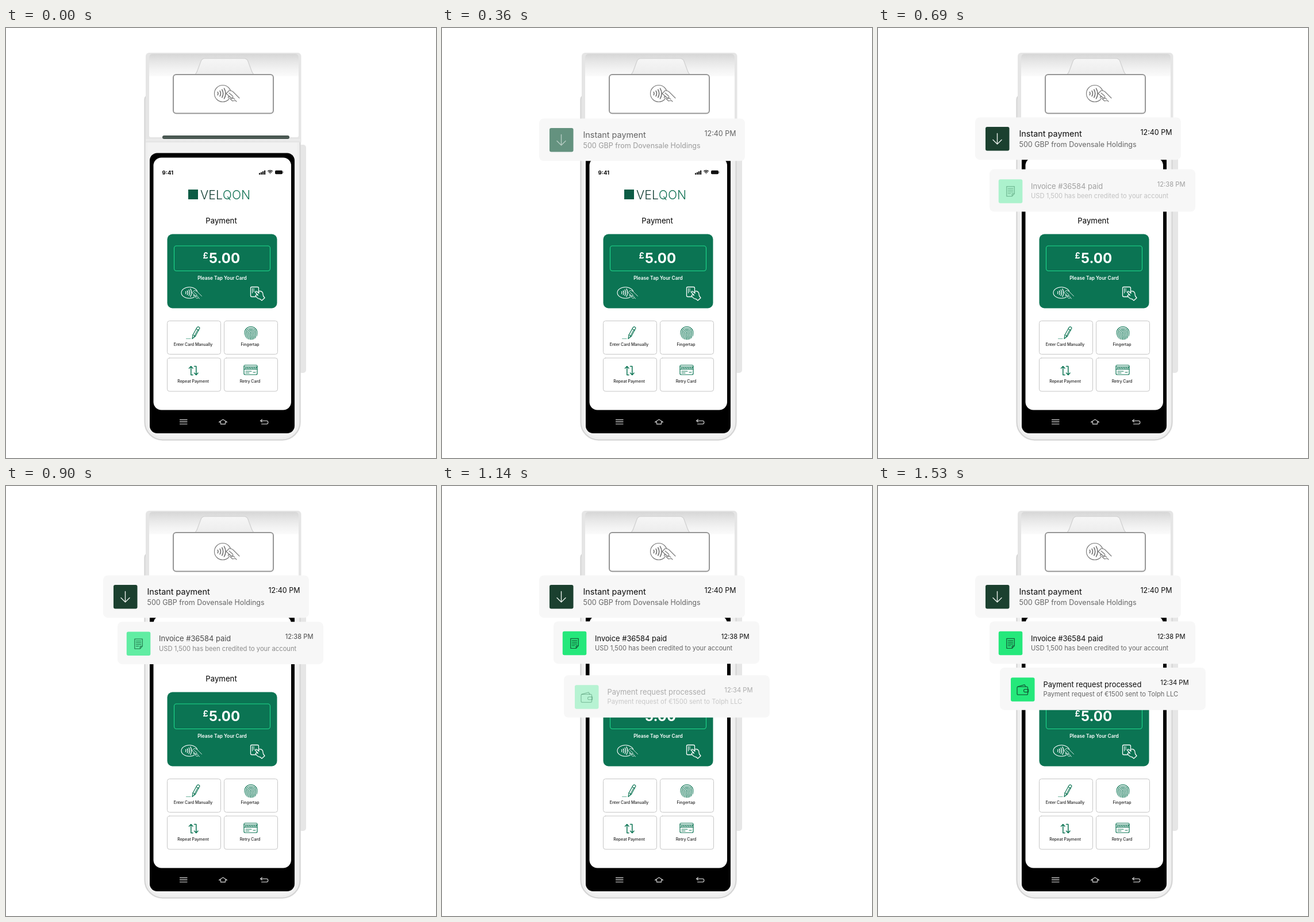
An HTML page with a canvas that plays this animation: 748 by 748 pixels, repeating every 4770 ms.

```html
<!DOCTYPE html>
<html lang="en">
<head>
<meta charset="utf-8">
<title>Payment notifications</title>
<style>
  html, body { margin: 0; width: 100%; height: 100%; overflow: hidden; background: #fff; }
  canvas { display: block; width: 748px; height: 748px; }
</style>
</head>
<body>
<canvas id="stage" width="748" height="748"></canvas>
<script>
const ctx = document.getElementById('stage').getContext('2d');
const LOOP = 4770, TICK = 30, STAGGER = 480, DURATION = 570, RISE = 41;
const FONT = 'Inter, "Open Sans", sans-serif';
const GREEN = '#0b7453';
const start = performance.now();

function box(x, y, w, h, r, fill, stroke, line = 1) {
  ctx.beginPath();
  ctx.roundRect(x, y, w, h, r);
  if (fill) { ctx.fillStyle = fill; ctx.fill(); }
  if (stroke) { ctx.strokeStyle = stroke; ctx.lineWidth = line; ctx.stroke(); }
}

function text(str, x, y, size, weight, color, align = 'left') {
  ctx.font = `${weight} ${size}px ${FONT}`;
  ctx.textAlign = align;
  ctx.fillStyle = color;
  ctx.fillText(str, x, y);
}

function path(d, stroke, line = 1, fill) {
  const p = new Path2D(d);
  if (fill) { ctx.fillStyle = fill; ctx.fill(p); }
  if (stroke) {
    ctx.strokeStyle = stroke;
    ctx.lineWidth = line;
    ctx.lineCap = ctx.lineJoin = 'round';
    ctx.stroke(p);
  }
}

function shade(y0, y1, ...stops) {
  const g = ctx.createLinearGradient(0, y0, 0, y1);
  stops.forEach((c, i) => g.addColorStop(i / (stops.length - 1), c));
  return g;
}

function at(x, y, draw) {
  ctx.save();
  ctx.translate(x, y);
  draw();
  ctx.restore();
}

// Contactless waves with a hand holding a card
function tapIcon(x, y, rx, ry, scale, color, back) {
  at(x, y, () => {
    ctx.beginPath();
    ctx.ellipse(0, 0, rx, ry, 0, 0, 7);
    ctx.strokeStyle = color;
    ctx.lineWidth = 1.1;
    ctx.stroke();
    ctx.scale(scale, scale);
    ctx.lineWidth = 1.7;
    ctx.lineCap = 'round';
    for (let i = 0; i < 4; i++) {
      ctx.beginPath();
      ctx.arc(-13, 0, 5 + i * 4.3, -0.52, 0.52);
      ctx.stroke();
    }
    path('M6 1L11 -5L17 -4L23 2L29 8L23 14L18 10L14 12L9 8Z', null, 0, back);
    path('M6 0L11 -5Q14 -6 18 -3L24 3L29 8M6 0L14 7M11 -1L17 4Q19 7 16 8L10 5Q8 8 13 9L17 13L22 12L24 14M14 9L18 8L21 10', color, 1.1);
  });
}

function cardHandIcon() {
  at(425, 450, () => {
    box(0.5, 0.5, 14, 17, 2, null, '#fff', 1.3);
    path('M3.5 3V11M6 3V9', '#fff', 1);
    path('M8.5 9.5Q9 7 11.5 8.5L15 11.5L14.5 8Q19 6.5 21.5 10.5L22.5 16L25 19.5L20 24L17 21.5Q12 21 9 15.5Q10.5 13 13.5 15Z', '#fff', 1.3, GREEN);
  });
}

function pencilIcon() {
  path('M313.5 540.5H321', '#6fb49d', 1);
  path('M324 540.5L325 534L332.5 520.5Q335 518.5 337 522L329.5 536Z', GREEN, 1.2);
  path('M331 523.5L335.5 526M325 534L329.5 536M334 524L327 537', GREEN, 1);
}

function fingerIcon() {
  at(426, 530.5, () => {
    ctx.beginPath();
    ctx.ellipse(0, 0, 11.8, 12, 0, 0, 7);
    ctx.clip();
    for (let r = 1.2; r < 12; r += 2.45) {
      path(`M${-r - 1} 11Q${-r} 6 ${-r} 0A${r} ${r} 0 0 1 ${r} 0Q${r} 6 ${r - 1.5} 12`, GREEN, 1.15);
    }
  });
}

function repeatIcon() {
  path('M325 603.5H321.8V589M318.5 592L321.8 588.5L325 592', GREEN, 1.5);
  path('M327.5 588.5H330.8V603M327.5 600L330.8 603.5L334 600', GREEN, 1.5);
}

function retryIcon() {
  box(414, 586.5, 23, 16.5, 2, null, GREEN, 1.2);
  path('M414 589.5H437M414 593.5H437', GREEN, 1);
  for (let x = 416; x < 436; x += 3) path(`M${x} 593L${x + 2} 590`, GREEN, 1.2);
  path('M417 597H427M417 600H423M430 599H434', GREEN, 1);
}

function printer() {
  box(243, 43, 270.5, 156, [6, 6, 0, 0], '#e5e5e5');
  box(249, 45, 260, 145, [5, 5, 3, 3], '#fff');
  box(249, 45, 260, 39, [5, 5, 0, 0], shade(45, 84, '#d6d6d6', '#e6e6e6', '#f2f2f2', '#fbfbfb'));
  path('M327 82Q331 80 333 74L339 58Q341 53 346 53H414Q419 53 421 58L427 74Q429 80 433 82Z', '#d0d0d0', 1.2,
    shade(53, 82, '#f6f6f6', '#ececec'));
  box(291, 81, 174, 67.5, 5, '#fff', '#969696', 2);
  tapIcon(377, 114, 14.5, 14.5, 1, '#777', '#fff');
  box(272, 187, 221, 6, 3, '#42514b');
  path('M274 190H491', '#6b7772', 0.8);
}

function body() {
  box(511, 203, 11, 397, [3, 5, 5, 3], '#e6e6e6');
  box(241.5, 116.5, 270, 600, [8, 8, 31, 31], '#f2f2f2', '#d6d6d6', 2.4);
  box(245, 150, 263, 563, [4, 4, 27, 27], '#f2f2f2', '#e9e9e9', 1);
  printer();
  box(243, 193.5, 269, 5, 0, shade(193, 199, '#f0f0f0', '#e1e1e1'));
  box(250, 217.5, 252, 487.5, 13, '#000');
  box(256.5, 225.5, 239.5, 439, 14, '#fff');
}

function statusBar() {
  text('9:41', 271.5, 255, 9.6, 700, '#111');
  for (let i = 0; i < 4; i++) box(440 + i * 3, 252.2 - i * 1.5, 2.2, 2.8 + i * 1.5, 0.5, '#111');
  ctx.strokeStyle = '#111';
  ctx.lineWidth = 1.5;
  ctx.lineCap = 'butt';
  for (const r of [1, 3.7, 6.3]) {
    ctx.beginPath();
    ctx.arc(459.5, 254, r, -2.3, -0.84);
    ctx.stroke();
  }
  box(468, 247.8, 13, 6.4, 1.8, '#111');
  box(481.6, 249.7, 1, 2.6, 0.5, '#777');
}

function button(x, y, label, icon) {
  box(x + 0.5, y + 0.5, 93, 58, 4, '#fff', '#c6c6c6');
  icon();
  text(label, x + 45.5, y + 43.5, 7, 500, '#222', 'center');
}

function screen() {
  statusBar();
  box(317, 281, 17, 17, 0, '#0c5c45');
  text('VEL', 338, 297.5, 21.2, 300, '#143f34');
  const half = ctx.measureText('VEL').width;
  text('QON', 338 + half, 297.5, 21.2, 300, '#157457');
  text('Payment', 374.5, 339.5, 13.2, 400, '#000', 'center');

  box(280.5, 358.5, 191, 129, 9, GREEN);
  box(292.5, 379, 167, 43.5, 4, null, '#1fd98c', 1.1);
  text('£', 342.5, 401, 14.5, 700, '#fff');
  text('5.00', 353, 409.3, 24, 700, '#fff');
  text('Please Tap Your Card', 376, 438, 8.3, 600, '#fff', 'center');
  tapIcon(319, 460.5, 14, 9.7, 0.74, '#fff', GREEN);
  cardHandIcon();

  button(280, 509, 'Enter Card Manually', pencilIcon);
  button(379, 509, 'Fingertap', fingerIcon);
  button(280, 573.5, 'Repeat Payment', repeatIcon);
  button(379, 573.5, 'Retry Card', retryIcon);

  path('M302.5 681.5H315M302.5 685H315M302.5 688.8H315', '#c0c0c0', 1.3);
  path('M370.5 685.5L377.5 681L384.5 685.5H381.5V689H373.5V685.5Z', '#c0c0c0', 1.3);
  path('M445.5 681L442.5 683.3L445.5 685.6M442.5 683.3H453.5Q455.8 683.3 455.8 686T453.5 688.8H444.5', '#c0c0c0', 1.3);
}

const arrow = () => path('M20.5 11.5V30M13 22.5L20.5 30L28 22.5', '#e8eeea', 1.4);

const invoice = () => {
  path('M14 12.5H27.5V25L23.5 29.5H14ZM27.5 25H23.5V29.5', '#14603a', 1.3);
  path('M16.5 16H25M16.5 19H25M16.5 22H25M16.5 25H21', '#14603a', 1.2);
};

const wallet = () => {
  box(11, 16, 18.5, 14, 2, null, '#14603a', 1.3);
  path('M12 16L24 12.5L26 16M30.5 20.5H25Q22.5 20.5 22.5 23T25 25.3H30.5Z', '#14603a', 1.3);
};

// tint is the settled icon colour, fresh the one shown while fading in
const cards = [
  { x: 169, y: 155.5, icon: [18, 16.5], tint: '#1b402f', fresh: '#0f573a', draw: arrow, textX: 76.5, timeX: 342.5,
    sizes: [14.4, 12.5], lines: [33, 51.5, 30.5],
    title: 'Instant payment', note: '500 GBP from Dovensale Holdings', time: '12:40 PM' },
  { x: 194, y: 235.5, icon: [15.8, 17.3], tint: '#25e87b', fresh: '#2ce985', draw: invoice, textX: 72, timeX: 340.5,
    sizes: [12.9, 11.2], lines: [34, 50.5, 30],
    title: 'Invoice #36584 paid', note: 'USD 1,500 has been credited to your account', time: '12:38 PM' },
  { x: 212, y: 316, icon: [19, 17.2], tint: '#25e87b', fresh: '#2ce985', draw: wallet, textX: 75.5, timeX: 328.5,
    sizes: [12.9, 11.2], lines: [33.7, 50.3, 29.5],
    title: 'Payment request processed', note: 'Payment request of €1500 sent to Tolph LLC', time: '12:34 PM' }
];

// The panel is opaque at once; its contents fade in while it rises
function notice(c, age) {
  if (age <= 0) return;
  const p = Math.min(age / DURATION, 1);
  const [title, note] = c.sizes;
  at(c.x, c.y + RISE * (1 - p) ** 3, () => {
    box(0, 0, 358, 73.7, 8, '#f7f7f7');
    ctx.globalAlpha = p;
    text(c.title, c.textX, c.lines[0], title, 400, '#0c0c0c');
    text(c.note, c.textX, c.lines[1], note, 400, '#666');
    text(c.time, c.timeX, c.lines[2], note, 400, '#0c0c0c', 'right');
    at(...c.icon, () => {
      box(0, 0, 41.5, 41.5, 3, p < 1 ? c.fresh : c.tint);
      c.draw();
    });
  });
}

function frame() {
  const now = (performance.now() - start) % LOOP;
  const t = Math.floor(now / TICK) * TICK;
  ctx.fillStyle = '#fff';
  ctx.fillRect(0, 0, 748, 748);
  body();
  screen();
  cards.forEach((c, i) => notice(c, t - i * STAGGER));
  requestAnimationFrame(frame);
}
frame();
</script>
</body>
</html>
```
